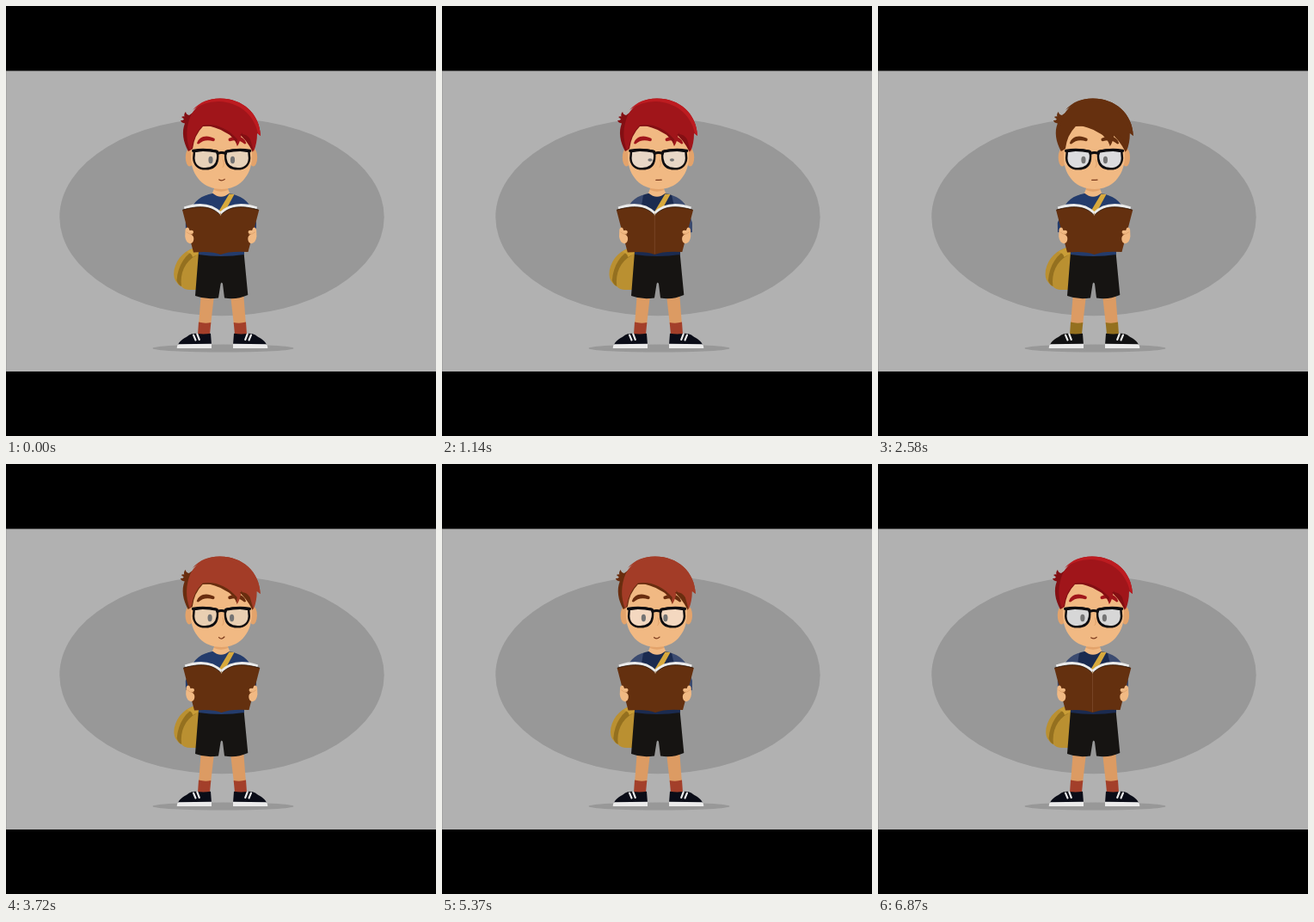
Recreate the animation shown at these times as an HTML page with a canvas. Size 500 by 500 pixels, loop 6900 ms.

```html
<!DOCTYPE html>
<html lang="en">
<head>
<meta charset="utf-8">
<title>Boy reading</title>
<style>
html, body { margin: 0; width: 100%; height: 100%; overflow: hidden; background: #000; }
canvas { display: block; width: 500px; height: 500px; }
</style>
</head>
<body>
<canvas id="stage" width="500" height="500"></canvas>
<script>
const ctx = document.getElementById('stage').getContext('2d');
const LOOP = 6900, STEP = 30;
const SKIN = '#f1b983', BROWN = '#64300f', BLACK = '#0d0c0f', WHITE = '#ebebeb';

// Colour moods, each held until its end time
const RED = { hair: '#a0151a', rim: '#bd1b20', under: '#830f13', brow: '#a0151a' };
const GINGER = { hair: '#a33c27', rim: '#a33c27', under: '#692d0f', brow: '#692d0f' };
const CHESTNUT = { hair: '#66300f', rim: '#66300f', under: '#66300f', brow: '#66300f' };
const FLAT = { shirt: '#243c6c', sleeve: '#243c6c' };
const SHADED = { shirt: '#1b2b50', sleeve: '#3b4b70' };
const WARM = { sock: '#a33f2a', leg: '#dc9b63', ear: '#e3a36b', shoe: '#0a0c17', crease: false };
const OCHRE = { ...WARM, sock: '#94701f', shoe: '#111112' };
const moods = [
  { end: 570, ...RED, ...FLAT, ...WARM, lens: '#e7d2b9' },
  { end: 1860, ...RED, ...SHADED, ...WARM, lens: '#e8d7c6', crease: true },
  { end: 3150, ...CHESTNUT, ...FLAT, ...OCHRE, lens: '#dcdcde' },
  { end: 4200, ...GINGER, ...FLAT, ...WARM, lens: '#e9cfb2' },
  { end: 5400, ...GINGER, ...SHADED, ...WARM, lens: '#f4d8c0' },
  { end: 6510, ...CHESTNUT, ...FLAT, ...OCHRE, lens: '#dededf', leg: '#d8a640', ear: '#d8a640' },
  { end: LOOP, ...RED, ...SHADED, ...WARM, lens: '#d7d7d7', crease: true }
];

const times = [0, 1140, 2580, 3720, 4680, 6120];
const bookKeys = [0, -2.2, 2, 1, -0.9, -1.5];
const gazeKeys = [0, 2.9, 0.1, -0.6, -1.9, -2.4];
const smileKeys = [1.5, 0, 0.2, 2.4, 2.2, 2];

// Smooth cyclic curve through the keys
function curve(keys, t) {
  const n = times.length;
  let i = n - 1;
  while (times[i] > t) i--;
  const at = k => times[(k + n) % n] + LOOP * Math.floor(k / n);
  const val = k => keys[(k + n) % n];
  const slope = k => (val(k + 1) - val(k - 1)) / (at(k + 1) - at(k - 1));
  const d = at(i + 1) - at(i), u = (t - at(i)) / d;
  const s = u * u * (3 - 2 * u);
  return val(i) * (1 - s) + val(i + 1) * s
    + d * (slope(i) * u * (1 - u) * (1 - u) - slope(i + 1) * u * u * (1 - u));
}

function fill(d, color) {
  ctx.fillStyle = color;
  ctx.fill(new Path2D(d));
}

function line(d, color, width, cap = 'round') {
  ctx.strokeStyle = color;
  ctx.lineWidth = width;
  ctx.lineCap = cap;
  ctx.lineJoin = 'round';
  ctx.stroke(new Path2D(d));
}

function oval(x, y, rx, ry, color) {
  ctx.fillStyle = color;
  ctx.beginPath();
  ctx.ellipse(x, y, rx, ry, 0, 0, Math.PI * 2);
  ctx.fill();
}

function rect(x, y, w, h, color) {
  ctx.fillStyle = color;
  ctx.fillRect(x, y, w, h);
}

function shifted(x, draw) {
  ctx.save();
  ctx.translate(x, 0);
  draw();
  ctx.restore();
}

// Draws a part and its mirror image around the axis x
function both(x, draw) {
  draw();
  ctx.save();
  ctx.translate(2 * x, 0);
  ctx.scale(-1, 1);
  draw();
  ctx.restore();
}

function backdrop() {
  rect(0, 0, 500, 500, '#000');
  rect(0, 75, 500, 1, '#666');
  rect(0, 76, 1, 349, '#a2a2a2');
  rect(1, 76, 499, 349, '#b1b1b1');
  oval(251, 245.2, 188.7, 115, '#989898');
  oval(252.5, 398, 82, 4.5, '#989898');
}

function bag() {
  fill('M222 280.5 C209 283 198.5 293 195.5 307 Q194 317 199 322 Q201 325 204 326 Q207 330 214 330 L222 330 L226 284Z', '#ba9031');
  fill('M221 283 C209 288 200 301 198.5 319 Q200 324 204 326 C202 311 208 297 221 290Z', '#94701f');
  fill('M223 280.5 Q215 282 210 286 Q216 287 217 292 L224 288Z', '#c99d37');
}

function legs(m) {
  both(251.5, () => {
    fill('M226.7 336 L242 336 L238 371 L224 371Z', m.leg);
    fill('M224 367.5 Q231 369.5 238.3 368 L237 382 L223 382Z', m.sock);
    fill('M200 394 C202 388 209 386 213 382.5 Q217 380 223 381 Q230 382 238 380.7 L239 394Z', m.shoe);
    fill('M198.7 398 Q198.5 394.5 200.5 393.3 L239 392.8 L239 398Z', WHITE);
    line('M218 382.5 L220.5 388.5 M222.3 381.5 L224.8 388', WHITE, 2.1);
  });
}

function body(m) {
  fill('M224 286 L276.5 286 L281.3 336 Q268 342 254 339.5 L252 323 Q250.7 320 249.6 323 L247 339.5 Q233 342 220 337Z', '#161412');
  fill('M224 240 L276.5 240 L277 289 Q250 293 224 289Z', m.shirt);
  fill('M236 219 C223 222 216 231 213 242 L208.8 252 L209 263 L226 266 L240 219Z', m.sleeve);
  fill('M264 219 C277 222 285 231 287 240 L291 252 L291 263 L276 266 L260 219Z', m.sleeve);
  fill('M234 220 Q249 213 267 220 L273 245 L230 245Z', m.shirt);
  fill('M240 217.5 L242.5 211 L257.5 211 L260 217.5 Q250 226 240 217.5Z', SKIN);
  fill('M242.3 211 L257.7 211 L258 214 Q250 217.5 242 214Z', m.ear);
  fill('M259.5 218.5 L265.5 219 L253.5 241 L246 241Z', '#d7a93d');
}

function book(m) {
  line('M207.5 235.4 C222 230.6 238 230 249.5 241.8 C261 230 277 230.6 291.5 235.4', WHITE, 4.2, 'butt');
  fill('M205 237 C224 231.5 239 231.5 249.5 243.5 C260 231.5 275 231.5 294.3 237'
    + ' L281.5 286 Q260 284.5 249.5 289 Q239 284.5 218 286.5Z', BROWN);
  line('M206 237 C224 231.8 239 232 249.5 243.3 C260 232 275 231.8 293 237', '#2a1609', 0.8);
  if (m.crease) line('M249.5 244 L249.5 288', '#7d4b2b', 0.8);
  line('M249.5 241 L249.5 243', '#c49b72', 1.2);
  both(249.8, () => {
    fill('M208.5 260 Q209.5 256.5 212.3 258 L213.5 261 Q218 260 218 262.7 Q218 265 214.5 265.5'
      + ' Q218.5 266.5 218.3 271 Q218 276 214 276.3 Q209 275 208.2 268Z', SKIN);
    line('M210 263 Q213 266 217 265.3', '#d99b65', 0.7);
  });
}

function hair(m) {
  // Back layer with the side curl
  fill('M212 169 C206 158 204 146 208 136.5 Q204 136 203 133 Q206 133.5 207 131.5 Q205.5 130 204 129'
    + ' Q206 128 207.5 128.5 Q206.5 125.5 209 123 Q209.5 126.5 213 127 L228 116 L284 130'
    + ' L291 149 L287 170 Q283 162 279 157 L271 148 Q252 138 229 140 Q219 150 217 166Z', m.under);
  fill('M214 168 C209 155 209 141 215 127 C222 114 234 107.5 249 107.5 C275 107.5 295 125 296 151'
    + ' L292 148 Q292 160 288 169 Q284 159 277 153 L274 147 Q273 157 269 163'
    + ' Q268 157 263 153 Q252 139 229 138.5 Q218 149 216 165Z', m.hair);
  fill('M217 121 C226 111 236 107.5 249 107.5 C275 107.5 295 125 296 151 L293 148'
    + ' C288 125 270 112 248 111 Q231 110.5 217 121Z', m.rim);
  fill('M229 138.5 Q251 135 269 155 Q268 159 269 163 Q265 151 255 147 Q244 140 229 138.5Z', m.under);
  fill('M272 149 Q280 148 284 155 L288 169 Q283 160 277 154Z', m.under);
}

function head(m, gaze, lid, smile) {
  both(250.5, () => oval(213.5, 176, 4.7, 10.5, m.ear));
  fill('M215 150 Q228 130 251 134 Q279 134 286 154 L286 177 C285 198 271 213 251 213'
    + ' C230 213 216 198 215 177Z', SKIN);
  both(250.7, () =>
    fill('M222 160 C224 151.5 233 149 242.5 154 Q243.5 157 241 157.3 Q231 154 224 160.5Z', m.brow));
  hair(m);

  const lens = 'M219 169 Q231 166 244 168.7 Q247 170 246 178 C245 186 240 189.3 232 189.3'
    + ' C223 189.3 218.7 184 218.3 177Z';
  both(250.7, () => fill(lens, m.lens));
  oval(238 + gaze, 179, 2.6, 4.2 * lid, '#747474');
  oval(263.5 + gaze, 179, 2.6, 4.2 * lid, '#747474');
  both(250.7, () => {
    line(lens, BLACK, 2.5);
    line('M217.7 168.4 Q231 166 245.5 169.3', BLACK, 3.2);
  });
  line('M246 171.5 Q250.7 169.5 255.5 171.5', BLACK, 3);
  line('M252.5 179 Q254.5 185 252 187.5', '#dfa169', 0.9);
  line(`M247.8 ${202.4 - smile / 3} Q251 ${202.4 + smile} 254.2 ${202.2 - smile / 2}`, '#7b3a1c', 1.2);
}

function draw(t) {
  const m = moods.find(x => t < x.end);
  const sway = Math.sin(t / LOOP * Math.PI * 2);
  const lid = Math.max(0.12, Math.min(1, Math.abs(t - 1200) / 150));
  backdrop();
  shifted(-0.8 * sway, bag);
  legs(m);
  body(m);
  shifted(1.2 * sway, () => head(m, curve(gazeKeys, t), lid, curve(smileKeys, t)));
  shifted(curve(bookKeys, t), () => book(m));
}

const start = performance.now();
function tick(now) {
  const t = Math.max(0, now - start) % LOOP;
  draw(Math.floor(t / STEP) * STEP);
  requestAnimationFrame(tick);
}
draw(0);
requestAnimationFrame(tick);
</script>
</body>
</html>
```
